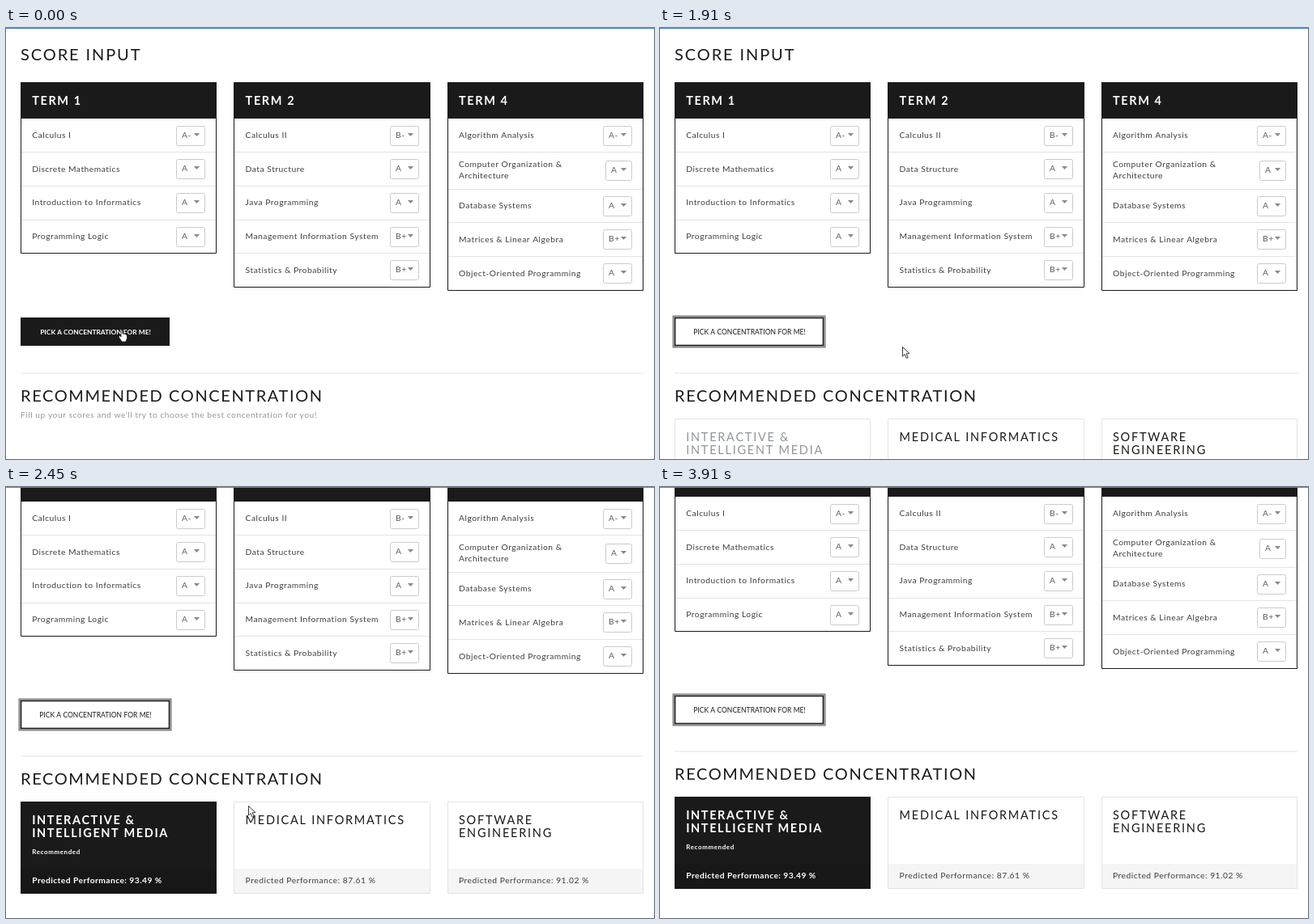
An HTML page with a canvas that plays this animation: 800x533 px, repeating every 4.54 s.

```html
<!DOCTYPE html>
<html lang="en">
<head>
<meta charset="utf-8">
<title>Score input</title>
<style>
  html, body { margin: 0; width: 100%; height: 100%; overflow: hidden; background: #fff; }
  canvas { display: block; width: 800px; height: 533px; }
</style>
</head>
<body>
<canvas id="stage" width="800" height="533"></canvas>
<script>
const ctx = document.getElementById('stage').getContext('2d');
const LOOP = 4540;
const INK = '#1a1a1a', LINE = '#e4e4e4', BODY = '#3e3e3e', MUTED = '#92969a';
const LEFT = 17.8, PITCH = 263.4, COL_W = 242.4, PAD = 14.4;
const ROW = 41.7, TALL_ROW = 45.4;

const terms = [
  { title: 'TERM 1', rows: [
    ['Calculus I', 'A-'], ['Discrete Mathematics', 'A'],
    ['Introduction to Informatics', 'A'], ['Programming Logic', 'A']] },
  { title: 'TERM 2', rows: [
    ['Calculus II', 'B-'], ['Data Structure', 'A'], ['Java Programming', 'A'],
    ['Management Information System', 'B+'], ['Statistics & Probability', 'B+']] },
  { title: 'TERM 4', rows: [
    ['Algorithm Analysis', 'A-'], ['Computer Organization &|Architecture', 'A'],
    ['Database Systems', 'A'], ['Matrices & Linear Algebra', 'B+'],
    ['Object-Oriented Programming', 'A']] }
];

const cards = [
  { title: 'INTERACTIVE &|INTELLIGENT MEDIA', score: '93.49', best: true },
  { title: 'MEDICAL INFORMATICS', score: '87.61' },
  { title: 'SOFTWARE|ENGINEERING', score: '91.02' }
];

// Text styles: size, spacing, weight
const BODY_TEXT = [10.3, 0.5, 400], BODY_BOLD = [10.3, 0.42, 700];
const TITLE = [14.5, 1.75, 400], TITLE_BOLD = [14.5, 1.6, 700];

// Waypoints: time, then values
const pointerPath = [
  [560, 139, 373], [640, 146, 372], [730, 146, 372], [910, 228, 387], [1000, 228, 387],
  [1360, 290, 391], [1550, 299, 394], [3000, 299, 394], [3360, 319, 390], [3550, 317, 382],
  [3730, 559, 507]
];
const scrollPath = [[2000, 0], [2180, 21], [2270, 86], [2450, 94], [2640, 100]];

function along(path, t) {
  const i = path.findIndex(point => point[0] > t);
  if (i < 0) return path[path.length - 1].slice(1);
  if (i === 0) return path[0].slice(1);
  const a = path[i - 1], b = path[i];
  const p = (t - a[0]) / (b[0] - a[0]);
  return a.slice(1).map((v, j) => v + (b[j + 1] - v) * p);
}

// The picture advances eleven times a second, on 10 ms boundaries.
function snap(t) {
  const start = k => Math.round(k * 100 / 11) * 10;
  let k = Math.floor(t * 11 / 1000) + 1;
  while (start(k) > t) k--;
  return start(k);
}

// CSS "ease" curve
function ease(p) {
  if (p <= 0) return 0;
  if (p >= 1) return 1;
  const bez = (a, b, u) => 3 * a * u * (1 - u) ** 2 + 3 * b * u * u * (1 - u) + u ** 3;
  let lo = 0, hi = 1;
  for (let i = 0; i < 20; i++) {
    const mid = (lo + hi) / 2;
    if (bez(0.25, 0.25, mid) < p) lo = mid; else hi = mid;
  }
  return bez(0.1, 1, lo);
}

function gray(from, to, p) {
  const v = Math.round(from + (to - from) * p);
  return `rgb(${v},${v},${v})`;
}

function text(str, x, y, [size, spacing, weight], color, align = 'left') {
  ctx.font = `${weight} ${size}px Lato, "Open Sans", sans-serif`;
  ctx.letterSpacing = spacing + 'px';
  ctx.textAlign = align;
  ctx.fillStyle = color;
  ctx.fillText(str, x, y);
}

function lines(str, x, y, step, style, color) {
  str.split('|').forEach((s, i) => text(s, x, y + i * step, style, color));
}

function rect(x, y, w, h, color) {
  ctx.fillStyle = color;
  ctx.fillRect(x, y, w, h);
}

function frame(x, y, w, h, color) {
  ctx.strokeStyle = color;
  ctx.lineWidth = 1;
  ctx.strokeRect(x + 0.5, y + 0.5, w - 1, h - 1);
}

function column(i) {
  const x = LEFT + i * PITCH, left = Math.round(x);
  return { left, w: Math.round(x + COL_W) - left, tx: x + PAD };
}

function select(x, y, w, grade) {
  ctx.beginPath();
  ctx.roundRect(x + 0.5, y + 0.5, w - 1, 24, 2);
  ctx.strokeStyle = '#cbcbcb';
  ctx.lineWidth = 1;
  ctx.stroke();
  text(grade, x + 7, y + 14.5, BODY_TEXT, '#5c5c5c');
  const cx = x + w - 10.5;
  ctx.beginPath();
  ctx.moveTo(cx - 3.6, y + 9);
  ctx.lineTo(cx + 3.6, y + 9);
  ctx.lineTo(cx, y + 13);
  ctx.fillStyle = '#8a8a8a';
  ctx.fill();
}

function drawTerm({ title, rows }, i) {
  const { left, w, tx } = column(i);
  let y = 112;
  rows.forEach(([name, grade], r) => {
    const tall = name.includes('|');
    if (r) rect(left + 1, Math.floor(y), w - 2, 1, LINE);
    lines(name, tx, Math.round(y + (tall ? 18.5 : 24)), 14, BODY_TEXT, BODY);
    const boxW = tall ? 33 : 36;
    select(left + w - 14 - boxW, Math.floor(y + (tall ? 11 : 9)), boxW, grade);
    y += tall ? TALL_ROW : ROW;
  });
  frame(left, 67, w, Math.floor(y) + 1 - 67, INK);
  rect(left, 67, w, 45, INK);
  text(title, tx, 95, TITLE_BOLD, '#fff');
}

function drawButton(t) {
  const focused = t >= 640;
  const p = ease((t - 1000) / 640);
  if (focused) rect(15.4, 355.4, 189.2, 40.2, '#8c8c8c');
  rect(18, 358, 184, 35, INK);
  if (focused) rect(19.3, 359.3, 181.4, 32.4, gray(26, 255, p));
  text('PICK A CONCENTRATION FOR ME!', 110.5, 379,
    p > 0 ? [8.5, 0.05, 400] : [8.4, 0, 700], gray(255, 26, p), 'center');
}

function drawCard({ title, score, best }, i, t) {
  const { left, w, tx } = column(i);
  const dark = best && t >= 2270;
  const ink = dark ? '#fff' : best ? MUTED : gray(150, 26, ease((t - 1730) / 180));
  rect(left, 483, w, 114, dark ? INK : '#fff');
  rect(left, 566, w, 31, dark ? '#171717' : '#f5f5f5');
  frame(left, 483, w, 114, dark ? INK : LINE);
  lines(title, tx, 511, 16, dark ? TITLE_BOLD : TITLE, ink);
  if (dark) text('Recommended', tx, 548, [8, 0.6, 700], '#fff');
  text(`Predicted Performance: ${score} %`, tx, 584, dark ? BODY_BOLD : BODY_TEXT,
    dark ? '#fff' : BODY);
}

function shape(points, x, y) {
  ctx.beginPath();
  points.forEach(([px, py]) => ctx.lineTo(x + px, y + py));
  ctx.closePath();
  ctx.fillStyle = '#fff';
  ctx.fill();
  ctx.strokeStyle = '#222';
  ctx.lineWidth = 0.9;
  ctx.lineJoin = 'round';
  ctx.stroke();
}

const arrow = [[0.5, 0.5], [0.5, 12], [3.2, 9.5], [5.2, 14.3], [7.2, 13.4], [5.2, 8.8], [9, 8.6]];
const hand = [[3, 1], [4, 0.5], [5, 1], [5, 5], [8.5, 5.6], [10.5, 7], [10.5, 10.5],
  [9, 15], [4, 15], [0.5, 9.5], [0.5, 8], [1.5, 7.5], [3, 9]];

function draw(t) {
  rect(0, 0, 800, 533, '#fff');
  ctx.save();
  ctx.translate(0, -Math.round(along(scrollPath, t)[0]));
  text('SCORE INPUT', 18, 40, [20, 1.9, 400], INK);
  terms.forEach(drawTerm);
  drawButton(t);
  rect(18, 426.5, 769, 1, LINE);
  text('RECOMMENDED CONCENTRATION', 18, 462, [20, 1.6, 400], INK);
  if (t < 1640) {
    text("Fill up your scores and we'll try to choose the best concentration for you!",
      18, 482, BODY_TEXT, '#999');
  } else {
    cards.forEach((card, i) => drawCard(card, i, t));
  }
  ctx.restore();
  rect(0, 0, 800, 1, '#4f83cc');
  if (t < 3910) {
    const [x, y] = along(pointerPath, t).map(Math.round);
    shape(t < 910 ? hand : arrow, x, y);
  }
}

const start = performance.now();
function loop() {
  draw(snap((performance.now() - start) % LOOP));
  requestAnimationFrame(loop);
}
loop();
</script>
</body>
</html>
```
